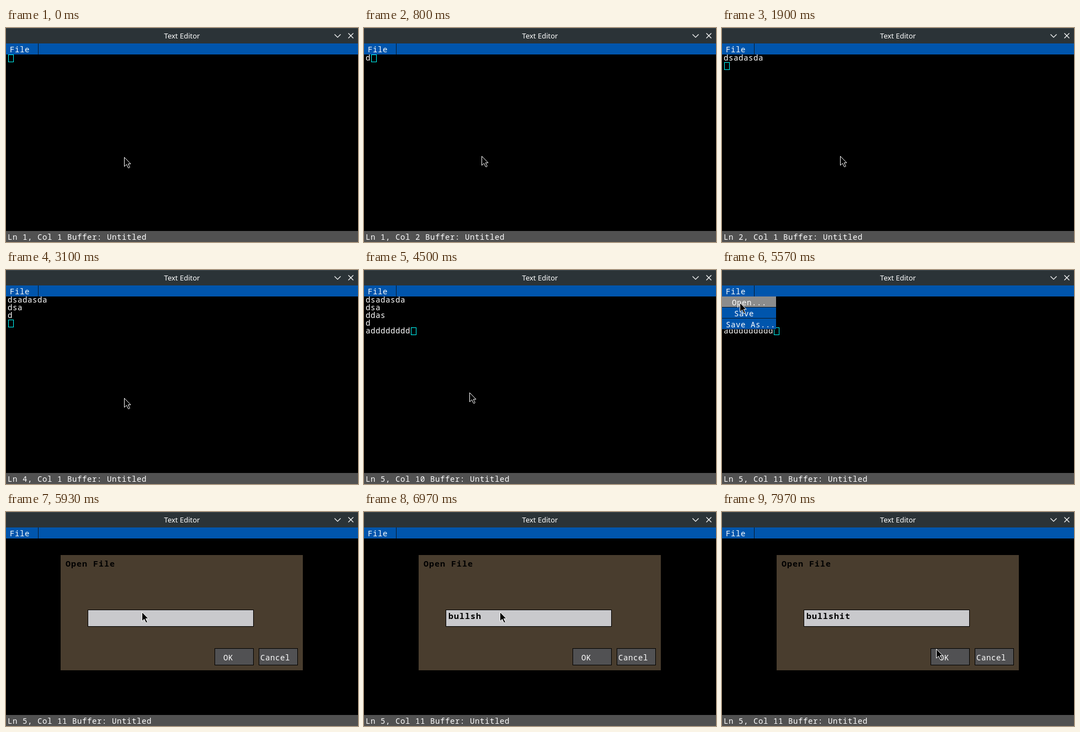
An HTML page for the animation above (8000 ms loop, 638 px wide and 388 px high).

```html
<!DOCTYPE html>
<html lang="en">
<head>
<meta charset="utf-8">
<title>Text Editor</title>
<style>
  html, body { margin: 0; width: 100%; height: 100%; overflow: hidden; background: #000; }
  svg { display: block; width: 638px; height: 388px; }
  text { font: 14px "Noto Sans Mono", monospace; letter-spacing: .6px; fill: #fff; white-space: pre; }
  .title { font: 13px "Noto Sans", sans-serif; letter-spacing: 0; text-anchor: middle; }
  .bold { font-size: 15px; font-weight: 700; letter-spacing: 1px; fill: #000; }
  .bar { fill: #0055ac; }
  .icon { fill: none; stroke: #fff; stroke-width: 1.2; }
  .edge { stroke: #000; }
  .shade { stroke: #0c1a2a; }
  .button { fill: #515153; }
</style>
</head>
<body>
<svg viewBox="0 0 638 388">
  <rect width="638" height="388"/>

  <g id="editor">
    <g id="lines"></g>
    <rect id="caret" width="9" height="13" fill="none" stroke="#00ffff"/>
  </g>

  <rect width="638" height="28" fill="#2b3337"/>
  <rect width="638" height="1" fill="#3d474d"/>
  <text class="title" x="319" y="19">Text Editor</text>
  <path class="icon" d="M595.5 11.5 601 17l5.5-5.5M620.5 9.5l9 9m0-9-9 9"/>

  <rect class="bar" y="28" width="638" height="20"/>
  <path class="shade" d="M58.5 28V48"/>
  <text x="7" y="44">File</text>

  <rect y="368" width="638" height="20" fill="#515151"/>
  <text id="status" x="3" y="384"></text>

  <g id="menu">
    <rect class="bar" y="48" width="98" height="60"/>
    <rect id="hover" y="48" width="98" height="19" fill="#8c8c8c"/>
    <path class="shade" d="M0 67.5H98M0 87.5H98M0 107.5H98"/>
    <text x="18" y="64">Open...</text>
    <text x="22" y="84">Save</text>
    <text x="7" y="104">Save As...</text>
  </g>

  <g id="dialog">
    <rect x="99" y="78" width="439" height="209" fill="#493d2e"/>
    <text class="bold" x="108" y="99">Open File</text>
    <rect class="edge" x="148.5" y="177.5" width="300" height="30" fill="#c9c9cc"/>
    <text id="field" class="bold" x="153" y="194"></text>
    <rect class="edge button" x="378.5" y="247.5" width="70" height="30"/>
    <text x="394" y="269">OK</text>
    <rect class="edge button" x="458.5" y="247.5" width="70" height="30"/>
    <text x="461" y="269">Cancel</text>
  </g>

  <path id="pointer" d="M.5.5V17l4-3.7 3 6.2q1.6.9 2.8-1L7.3 12.3H12Z" fill="#000" stroke="#fff" stroke-linejoin="round"/>
</svg>
<script>
const LOOP = 8000, BACKSPACE = '\b';
const el = id => document.getElementById(id);

// Keys of a burst: start time, gap between keys, characters.
const burst = (start, gap, keys) => [...keys].map((key, i) => [start + i * gap, key]);

const typing = [
  ...burst(770, 0, 'd'),
  ...burst(930, 110, 'sadasda'),
  ...burst(1850, 150, '\ndsa\n'),
  ...burst(2680, 240, 'd\n'),
  ...burst(3200, 80, BACKSPACE + 'das\nd\nad'),
  ...burst(4250, 40, 'dddddddd'),
];
const fileName = burst(6220, 150, 'bullshit');

const MENU_OPEN = 5230, MENU_HOVER = 5440, DIALOG_OPEN = 5720;

// Pointer stops: time, x, y.
const path = [
  [0, 214, 234], [300, 214, 234], [500, 213, 232], [1700, 213, 232], [1900, 214, 232],
  [4330, 214, 232], [4500, 191, 222], [4800, 95, 115], [5100, 30, 39], [5300, 30, 39],
  [5500, 32, 59], [5700, 32, 59], [5920, 246, 181], [7540, 246, 181], [7940, 388, 248],
  [LOOP, 388, 248],
];

const typed = (keys, t) => keys.reduce((text, [at, key]) =>
  at > t ? text : key === BACKSPACE ? text.slice(0, -1) : text + key, '');

function pointerAt(t) {
  const i = path.findIndex(stop => stop[0] > t);
  const [t0, x0, y0] = path[i - 1], [t1, x1, y1] = path[i];
  const p = (t - t0) / (t1 - t0);
  return [x0 + (x1 - x0) * p, y0 + (y1 - y0) * p].map(Math.round);
}

const rows = Array.from({ length: 5 }, (_, i) => {
  const row = document.createElementNS('http://www.w3.org/2000/svg', 'text');
  row.setAttribute('x', 3);
  row.setAttribute('y', 59 + 14 * i);
  return el('lines').appendChild(row);
});

const setText = (node, text) => { if (node.textContent !== text) node.textContent = text; };
const show = (id, on) => { el(id).style.display = on ? '' : 'none'; };

function draw(t) {
  const lines = typed(typing, t).split('\n');
  rows.forEach((row, i) => setText(row, lines[i] || ''));
  const line = lines.length - 1, col = lines[line].length;
  el('caret').setAttribute('x', 4.5 + 9 * col);
  el('caret').setAttribute('y', 48.5 + 14 * line);
  setText(el('status'), `Ln ${line + 1}, Col ${col + 1} Buffer: Untitled`);

  show('editor', t < DIALOG_OPEN);
  show('menu', t >= MENU_OPEN && t < DIALOG_OPEN);
  show('hover', t >= MENU_HOVER);
  show('dialog', t >= DIALOG_OPEN);
  setText(el('field'), typed(fileName, t));
  el('pointer').setAttribute('transform', `translate(${pointerAt(t)})`);
}

const start = performance.now();
function tick() {
  draw((performance.now() - start) % LOOP);
  requestAnimationFrame(tick);
}
tick();
</script>
</body>
</html>
```
